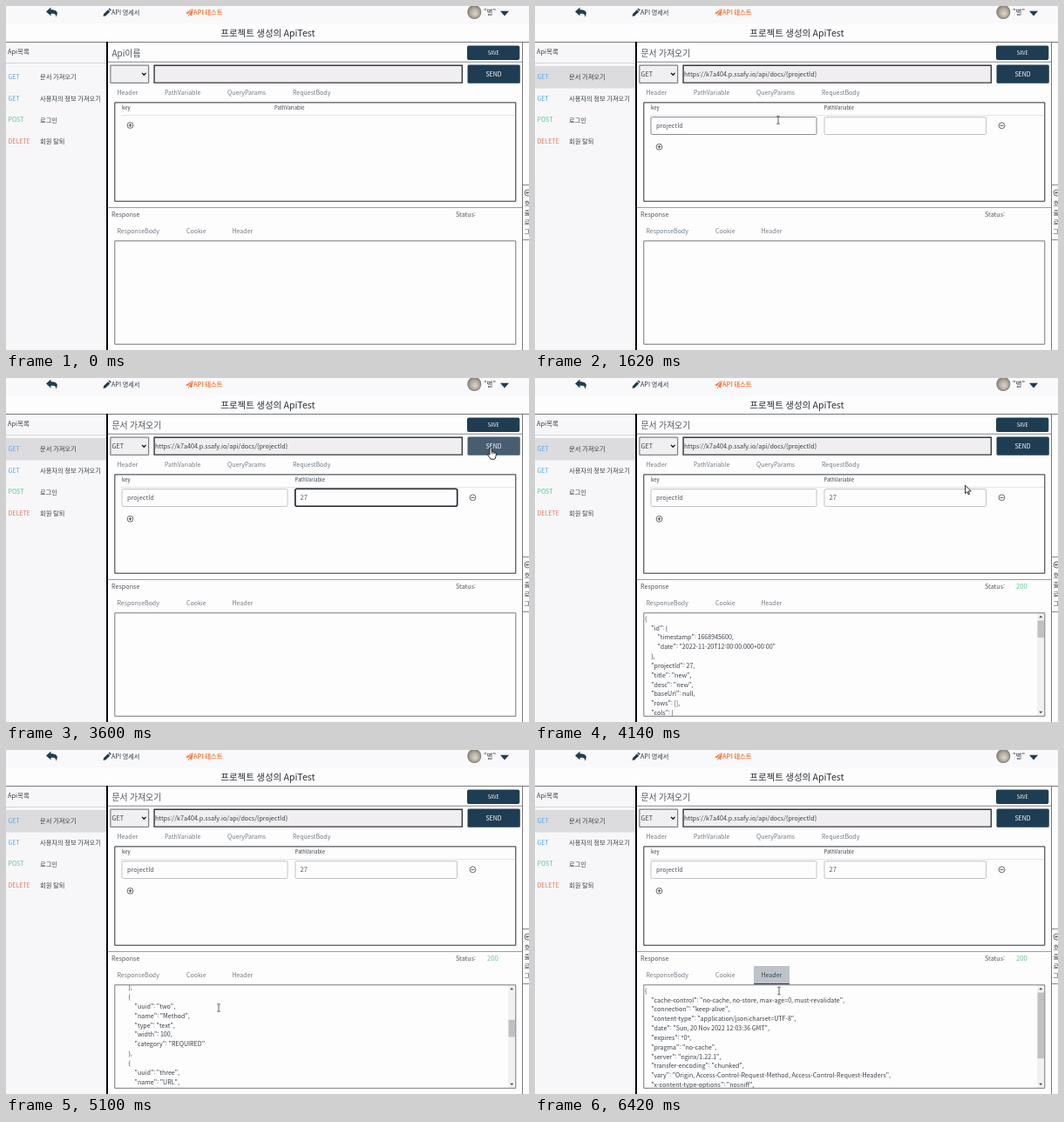
Recreate the animation shown at these times as an HTML page with a canvas. Size 600 px wide and 395 px high, loop 6.48 s.

```html
<!DOCTYPE html>
<html lang="ko">
<head>
<meta charset="utf-8">
<title>ApiTest</title>
<style>
html, body { margin: 0; width: 100%; height: 100%; overflow: hidden; background: #fdfdfe; }
canvas { display: block; width: 600px; height: 395px; }
</style>
</head>
<body>
<canvas id="stage"></canvas>
<script>
const W = 600, H = 395, LOOP = 6480, STEP = 60;
const FONT = '"Noto Sans CJK KR", "Noto Sans CJK JP", "Noto Sans", sans-serif';
const NAVY = '#1f3d52', INK = '#3a4147', SOFT = '#737c83', ORANGE = '#f67f45';
const LINE = 10.85;

// Moments at which the state of the page changes
const AT = { select: 1020, focus: 2040, two: 2460, seven: 2580, send: 3660, response: 3900, header: 6120 };

const canvas = document.getElementById('stage');
const dpr = window.devicePixelRatio || 1;
canvas.width = W * dpr;
canvas.height = H * dpr;
const c = canvas.getContext('2d');

const column = (uuid, name, width, category) => ({ uuid, name, type: 'text', width, category });
const toLines = data => JSON.stringify(data, null, 1).split('\n');

const bodyLines = toLines({
  id: { timestamp: 1668945600, date: '2022-11-20T12:00:00.000+00:00' },
  projectId: 27,
  title: 'new',
  desc: 'new',
  baseUrl: null,
  rows: [],
  cols: [
    column('one', 'Name', 100, 'REQUIRED'),
    column('two', 'Method', 100, 'REQUIRED'),
    column('three', 'URL', 100, 'REQUIRED'),
    column('d-one', 'Path Variable', 1, 'PAYLOAD'),
    column('d-two', 'Request Body', 1, 'PAYLOAD'),
    column('d-three', 'Response Body', 1, 'PAYLOAD')
  ]
});

const headerLines = toLines({
  'cache-control': 'no-cache, no-store, max-age=0, must-revalidate',
  connection: 'keep-alive',
  'content-type': 'application/json;charset=UTF-8',
  date: 'Sun, 20 Nov 2022 12:03:36 GMT',
  expires: '0',
  pragma: 'no-cache',
  server: 'nginx/1.22.1',
  'transfer-encoding': 'chunked',
  vary: 'Origin, Access-Control-Request-Method, Access-Control-Request-Headers',
  'x-content-type-options': 'nosniff',
  'x-frame-options': 'DENY',
  'x-xss-protection': '1; mode=block'
});

// [time, x, y]
const mousePath = [
  [60, 318, 384], [360, 240, 310], [660, 142, 208], [840, 72, 81], [1020, 72, 81],
  [1320, 170, 112], [1620, 279, 131], [1680, 290, 132], [2040, 372, 138], [2220, 384, 153],
  [2760, 384, 153], [3120, 470, 124], [3420, 556, 80], [4080, 556, 80],
  [4380, 244, 296], [5820, 244, 296], [6060, 270, 260], [6240, 272, 261], [6420, 280, 276.5]
];
// [time, offset]
const scrollPath = [[4500, 0], [4620, 45], [4860, 112], [5100, 188], [5160, 205], [5460, 458], [5580, 482], [5700, 484]];

function sample(path, t, i) {
  const n = path.findIndex(p => p[0] >= t);
  if (n === 0) return path[0][i];
  if (n < 0) return path[path.length - 1][i];
  const a = path[n - 1], b = path[n];
  return a[i] + (b[i] - a[i]) * (t - a[0]) / (b[0] - a[0]);
}

function text(str, x, mid, size, color = INK, weight = 400, align = 'left') {
  c.font = `${weight} ${size}px ${FONT}`;
  c.textAlign = align;
  c.fillStyle = color;
  c.fillText(str, x, mid + size * 0.36);
}

function fill(x, y, w, h, color, r = 0) {
  c.fillStyle = color;
  c.beginPath();
  c.roundRect(x, y, w, h, r);
  c.fill();
}

function frame(x, y, w, h, color, lw = 1, r = 0) {
  c.strokeStyle = color;
  c.lineWidth = lw;
  c.beginPath();
  c.roundRect(x + lw / 2, y + lw / 2, w - lw, h - lw, r);
  c.stroke();
}

function poly(points, color, outline) {
  c.beginPath();
  points.forEach(([x, y]) => c.lineTo(x, y));
  c.closePath();
  c.fillStyle = color;
  c.fill();
  if (outline) {
    c.strokeStyle = outline;
    c.lineWidth = 0.9;
    c.stroke();
  }
}

function stroke(points, color, lw) {
  c.strokeStyle = color;
  c.lineWidth = lw;
  c.beginPath();
  points.forEach(([x, y], i) => i ? c.lineTo(x, y) : c.moveTo(x, y));
  c.stroke();
}

function circleSign(x, y, plus) {
  c.strokeStyle = '#444';
  c.lineWidth = 0.8;
  c.beginPath();
  c.arc(x, y, 3.4, 0, Math.PI * 2);
  c.stroke();
  stroke([[x - 1.9, y], [x + 1.9, y]], '#444', 0.9);
  if (plus) stroke([[x, y - 1.9], [x, y + 1.9]], '#444', 0.9);
}

function drawNav() {
  fill(0, 0, W, 20, '#f9f9fb');
  // back arrow
  c.fillStyle = NAVY;
  c.beginPath();
  c.moveTo(46, 6.5);
  c.lineTo(51.5, 1.5);
  c.lineTo(51.5, 4.3);
  c.bezierCurveTo(57, 4.3, 61.5, 6.5, 57, 13);
  c.bezierCurveTo(58, 9, 55.5, 8.7, 51.5, 8.7);
  c.lineTo(51.5, 11.5);
  c.fill();
  // pencil
  poly([[111.5, 12], [112.2, 9], [117, 4.2], [119.3, 6.5], [114.5, 11.3]], NAVY);
  poly([[117.6, 3.6], [118.7, 2.6], [120.8, 4.8], [119.8, 5.8]], NAVY);
  text('API 명세서', 121, 7, 7.2, '#2b3a46', 500);
  // paper plane
  poly([[206, 8.2], [214.5, 2.5], [208.8, 9.2]], ORANGE);
  poly([[214.8, 2.8], [213.3, 11.5], [209.6, 9.6]], ORANGE);
  poly([[209, 10], [210.6, 10.8], [209, 12.3]], ORANGE);
  text('API 테스트', 215, 7, 7.2, ORANGE, 700);
  // account
  const g = c.createRadialGradient(538.5, 9, 1, 537.3, 7, 8.2);
  g.addColorStop(0, '#d6cfc5');
  g.addColorStop(0.6, '#b0a79b');
  g.addColorStop(1, '#7a7268');
  c.fillStyle = g;
  c.beginPath();
  c.arc(537.3, 7, 8, 0, Math.PI * 2);
  c.fill();
  text('"별"', 555, 7, 7.5, INK, 400, 'center');
  poly([[567, 5.8], [577, 5.8], [572, 11.5]], NAVY);
  text('프로젝트 생성의 ApiTest', 300.3, 31, 10.5, '#2b3136', 400, 'center');
}

function drawSidebar(selected) {
  fill(0, 41, 116, H - 41, '#f7f7f9');
  text('Api목록', 2, 52.6, 7.4);
  fill(0, 65, 116, 1, '#d5d5d9');
  if (selected) fill(0, 69, 115, 25.5, '#dcdbde');
  [
    ['GET', '#55a9e6', '문서 가져오기'],
    ['GET', '#55a9e6', '사용자의 정보 가져오기'],
    ['POST', '#52c888', '로그인'],
    ['DELETE', '#e5755f', '회원 탈퇴']
  ].forEach(([method, color, name], i) => {
    const y = 81.3 + i * 24.8;
    text(method, 2.5, y, 7, color);
    text(name, 39, y, 7.25);
  });
}

function drawLines() {
  fill(0, 41, W, 1, '#77797c');
  fill(115, 41, 2, H - 41, '#050505');
  fill(117, 63.7, 475, 1, '#85878a');
  fill(117, 231, 475, 1, '#9a9c9f');
  fill(592, 41, 1, H - 41, '#75777a');
}

function drawLogTab() {
  fill(593, 205, 7, 1, '#8a8a8e');
  fill(593, 268, 7, 1, '#8a8a8e');
  c.strokeStyle = '#444';
  c.lineWidth = 0.8;
  c.beginPath();
  c.arc(598.5, 214.5, 3.5, 0, Math.PI * 2);
  c.stroke();
  stroke([[598.5, 212.8], [596.8, 214.5], [598.5, 216.2]], '#444', 0.8);
  stroke([[596.8, 214.5], [600, 214.5]], '#444', 0.8);
  [...'호출로그'].forEach((ch, i) => text(ch, 594.5, 226.5 + i * 10.8, 7.3));
}

function drawRequest(t, mouse) {
  const selected = t >= AT.select;
  text(selected ? '문서 가져오기' : 'Api이름', 121.5, 54, 9.9, '#4c5358');
  fill(529, 45.6, 60.3, 16.4, NAVY, 2);
  text('SAVE', 559.3, 53.8, 5.5, '#fff', 400, 'center');
  fill(529.5, 67.6, 60.3, 21.2, mouse.onSend ? '#475d70' : NAVY, 1.5);
  text('SEND', 559.5, 78.1, 7, '#fff', 400, 'center');

  fill(119.4, 67.6, 44.8, 21.2, '#f0eff1');
  frame(119.4, 67.6, 44.8, 21.2, '#66686b');
  stroke([[156, 76.9], [158.3, 79.3], [160.6, 76.9]], '#111', 1.3);
  fill(169.4, 67.6, 354.6, 21.2, '#f0eef0');
  frame(169.4, 67.6, 354.6, 21.2, '#38393c', 1.4);
  if (selected) {
    text('GET', 121.5, 78, 7.2);
    text('https://k7a404.p.ssafy.io/api/docs/{projectId}', 171, 78, 7.17);
  }

  [['Header', 127.5], ['PathVariable', 182], ['QueryParams', 254], ['RequestBody', 329]]
    .forEach(([name, x]) => text(name, x, 99, 7, SOFT));

  frame(124.3, 110.4, 461, 114.3, '#2c2e31');
  text('key', 133, 117, 5.9);
  text('PathVariable', selected ? 331.5 : 308, 117, 5.85);
  fill(132, 125, 452, 1, '#e4e4e7');
  if (!selected) return circleSign(142.5, 137, true);

  const focused = t >= AT.focus && t < AT.send;
  frame(132.5, 127, 191, 21, mouse.onKey ? '#8a8c8f' : '#c3c4c7', 1, 1.5);
  if (focused) frame(331, 126.5, 187.5, 21.5, '#1c2329', 1.6, 2);
  else frame(331.5, 127, 186.5, 21, mouse.onValue ? '#8a8c8f' : '#c3c4c7', 1, 1.5);
  text('projectId', 139, 137.3, 7.3, '#565c61');
  text(t >= AT.seven ? '27' : t >= AT.two ? '2' : '', 337.5, 137.3, 7.5, '#565c61');
  if (focused && t < AT.two) fill(337.5, 133, 0.8, 9, '#111');
  circleSign(535.5, 137.3, false);
  circleSign(142.5, 161.8, true);
}

function drawResponse(t) {
  const arrived = t >= AT.response, onHeader = t >= AT.header;
  text('Response', 121, 239.2, 7.2, '#50575c');
  text('Status:', 516, 239.2, 7.2, '#50575c');
  if (arrived) text('200', 552, 239.2, 7.7, '#5ecb90');
  if (onHeader) {
    fill(251, 248, 41, 21, '#bdc3cb');
    fill(251, 268, 41, 1, NAVY);
  }
  [['ResponseBody', 127.5], ['Cookie', 207], ['Header', 259.5]]
    .forEach(([name, x], i) => text(name, x, 258.3, 7, onHeader && i === 2 ? INK : SOFT));

  if (arrived) {
    const lines = onHeader ? headerLines : bodyLines;
    const offset = onHeader ? 0 : sample(scrollPath, t, 1);
    c.save();
    c.beginPath();
    c.rect(125, 270, 451, 118);
    c.clip();
    lines.forEach((line, i) => {
      const trimmed = line.trimStart();
      const y = 276.1 + i * LINE - offset;
      if (y > 262 && y < 396) text(trimmed, 126 + (line.length - trimmed.length) * 7.2, y, 7.1);
    });
    c.restore();
    drawScrollbar(offset, lines.length * LINE + 4);
  }
  frame(124.3, 269.3, 461, 119.5, '#77797c');
}

function drawScrollbar(offset, content) {
  const track = 100;
  fill(576, 270, 8.5, 118, '#f1f1f2');
  fill(576.5, 278.5 + track * offset / content, 7.5, track * 118 / content, '#c1c1c3');
  poly([[578.2, 275.3], [582.2, 275.3], [580.2, 272.8]], '#505050');
  poly([[578.2, 382.7], [582.2, 382.7], [580.2, 385.2]], '#505050');
}

function readMouse(t) {
  const x = sample(mousePath, t, 1), y = sample(mousePath, t, 2);
  const inside = (l, top, r, b) => x >= l && x <= r && y >= top && y <= b;
  const form = t >= AT.select;
  const onSend = inside(529, 67, 590, 89);
  const onKey = form && inside(132, 127, 324, 148);
  const onValue = form && inside(331, 127, 518, 148);
  const onTab = inside(251, 248, 292, 269);
  let shape = 'arrow';
  if (onSend || onTab || inside(0, 69, 115, 168)) shape = 'hand';
  else if (onKey || onValue || inside(125, 270, 576, 388) || inside(169, 67, 524, 89)) shape = 'beam';
  return { x, y, onSend, onKey, onValue, shape };
}

const cursors = {
  arrow() {
    poly([[0, 0], [0, 9.4], [2.2, 7.4], [3.7, 10.6], [5, 10], [3.6, 6.9], [6.6, 6.7]], '#fff', '#111');
  },
  hand() {
    poly([[-1, 0.4], [0.3, 0], [1.2, 0.8], [1.2, 4.6], [3, 4.8], [4.6, 5.3], [6, 5.9], [6.5, 7], [6, 10],
      [4.8, 13.2], [0, 13.2], [-1.8, 10.4], [-3.6, 7.8], [-2.8, 7], [-1.1, 8.2]], '#fff', '#111');
    [[1.2, 5], [3.1, 5.2], [4.8, 5.6]].forEach(([x, y]) => stroke([[x, y], [x, 7.4]], '#111', 0.7));
  },
  beam() {
    stroke([[0, -4], [0, 4]], '#333', 0.8);
    stroke([[-1.8, -4.2], [1.8, -4.2]], '#333', 0.7);
    stroke([[-1.8, 4.2], [1.8, 4.2]], '#333', 0.7);
  }
};

function draw(t) {
  const mouse = readMouse(t);
  c.setTransform(dpr, 0, 0, dpr, 0, 0);
  fill(0, 0, W, H, '#fdfdfe');
  drawNav();
  drawSidebar(t >= AT.select);
  drawLines();
  drawLogTab();
  drawRequest(t, mouse);
  drawResponse(t);
  if (t < mousePath[0][0]) return;
  c.save();
  c.translate(mouse.x, mouse.y);
  cursors[mouse.shape]();
  c.restore();
}

const start = performance.now();
function tick() {
  const t = (performance.now() - start) % LOOP;
  draw(Math.floor(t / STEP) * STEP);
  requestAnimationFrame(tick);
}
tick();
</script>
</body>
</html>
```
